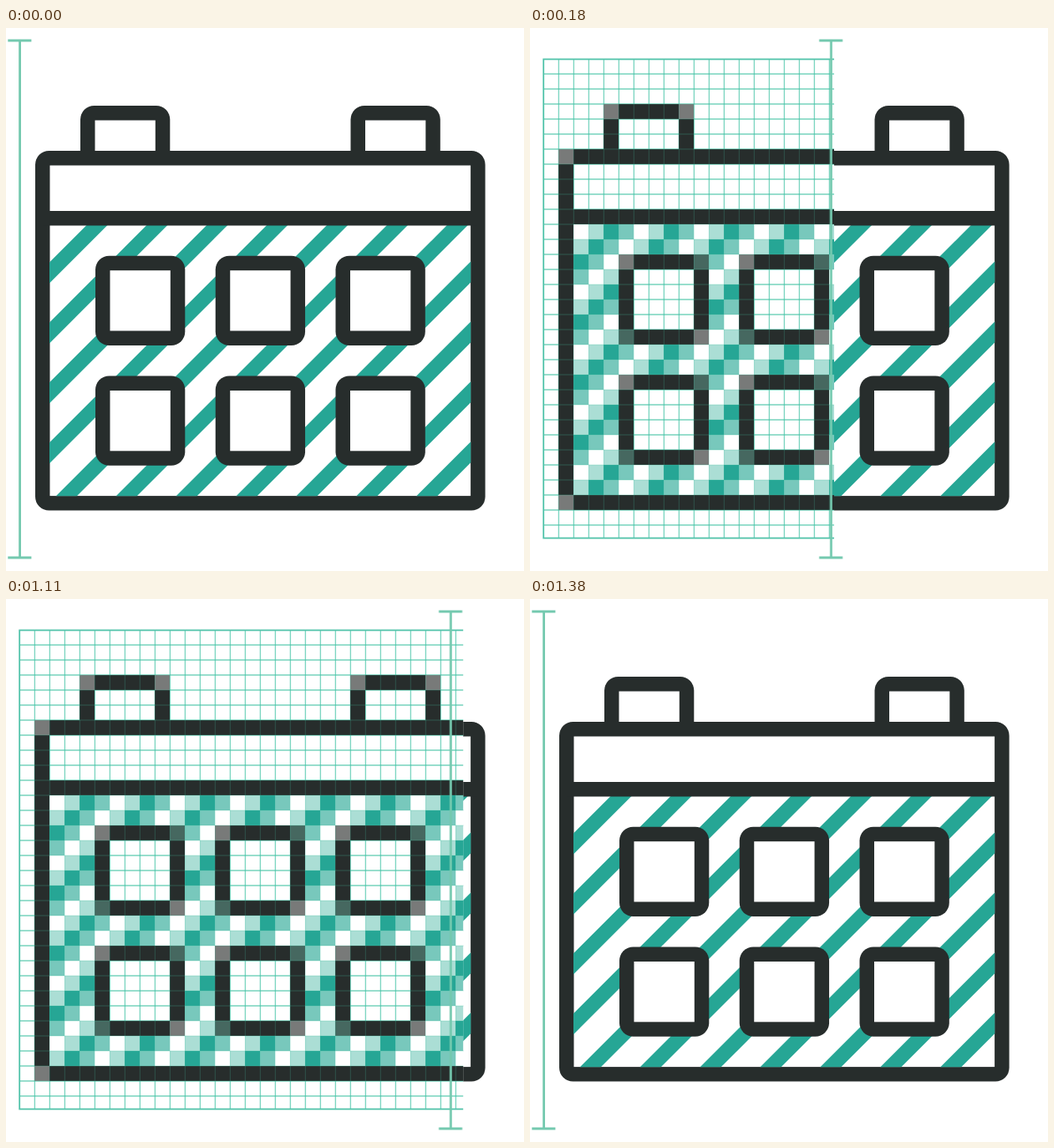
Write an HTML page that moves like this. It is 620 by 650 pixels and loops after 2250 ms.

```html
<!DOCTYPE html>
<html lang="en">
<head>
<meta charset="utf-8">
<title>Calendar icon: vector to pixels</title>
<style>
  html, body { margin: 0; width: 100%; height: 100%; overflow: hidden; background: #fff; }
  svg { position: absolute; left: 0; top: 0; width: 620px; height: 650px; }
  #pixels { animation: reveal 2250ms infinite; }
  #bar { animation: sweep 2250ms infinite; }

  /* ten 30 ms steps out, a hold, ten steps back, a hold */
  @keyframes sweep {
    0% { transform: translateX(0); animation-timing-function: steps(10, end); }
    13.3333%, 48% { transform: translateX(573px); animation-timing-function: steps(10, end); }
    61.3333%, 100% { transform: translateX(0); }
  }
  @keyframes reveal {
    0% { clip-path: inset(0 622.7px 0 0); animation-timing-function: steps(10, end); }
    13.3333% { clip-path: inset(0 11.7px 0 0); }
    48% { clip-path: inset(0 11px 0 0); animation-timing-function: steps(10, end); }
    61.3333%, 100% { clip-path: inset(0 629px 0 0); }
  }
</style>
</head>
<body>
<svg id="smooth" viewBox="0 0 620 650">
  <clipPath id="page"><rect x="52" y="236" width="504.3" height="324.3"/></clipPath>
</svg>
<svg id="pixels" viewBox="0 0 620 650"></svg>
<svg viewBox="0 0 620 650">
  <path id="bar" d="M2.3 15H30.4M2.3 634H30.4M16.6 15V634" fill="none" stroke="#74c9af" stroke-width="2.8"/>
</svg>
<script>
  const INK = '#272d2c', GRAY = '#787a79', MIXED = '#466860';
  const STRIPES = ['#78c8bc', '#ffffff', '#abded5', '#26a695'];

  function add(parent, tag, attrs) {
    const el = document.createElementNS('http://www.w3.org/2000/svg', tag);
    for (const name in attrs) el.setAttribute(name, attrs[name]);
    parent.appendChild(el);
    return el;
  }
  const box = (parent, x, y, width, height, fill, rx = 0) =>
    add(parent, 'rect', { x, y, width, height, fill, rx });

  // Smooth icon
  const smooth = document.getElementById('smooth');
  const EDGE = 17.5;

  function roundFrame(x, y, w, h) {
    box(smooth, x, y, w, h, INK, 16.5);
    box(smooth, x + EDGE, y + EDGE, w - 2 * EDGE, h - 2 * EDGE, '#fff');
  }

  for (const x of [89, 412.5]) {
    box(smooth, x, 93, 107.3, 80, INK, 16.5);
    box(smooth, x + EDGE, 110.5, 72.3, 40, '#fff');
  }
  roundFrame(35, 147, 538.6, 430.6);
  const stripes = add(smooth, 'g', { 'clip-path': 'url(#page)' });
  for (let i = 0; i < 11; i++) {
    const sum = 332.5 + 71.9 * i;
    add(stripes, 'path', {
      d: `M${sum - 230} 230h25l-340 340h-25z`,
      fill: STRIPES[3]
    });
  }
  box(smooth, 44, 219, 520, EDGE, INK);
  for (let row = 0; row < 2; row++)
    for (let col = 0; col < 3; col++)
      roundFrame(107 + 143.75 * col, 272.7 + 143.8 * row, 107.3, 107.3);

  // Pixel version on a grid of 18 px cells
  const pixels = document.getElementById('pixels');
  const CELL = 18, LEFT = 16.4, TOP = 37;

  box(pixels, 15, 36, 579, 576, '#fff');

  function gridLines(color, opacity) {
    let rows = '', cols = '';
    for (let i = 1; i < 32; i++) {
      rows += `M${LEFT} ${TOP + CELL * i}H591`;
      cols += `M${LEFT + CELL * i} ${TOP}V610.5`;
    }
    const style = { stroke: color, opacity, fill: 'none' };
    add(pixels, 'path', { d: rows, 'stroke-width': 1.7, ...style });
    add(pixels, 'path', { d: cols, 'stroke-width': 1.3, ...style });
  }

  gridLines('#45c4a7', 0.62);
  const cells = add(pixels, 'g', { 'shape-rendering': 'crispEdges' });
  const fillCells = (c, r, w, h, color) =>
    box(cells, LEFT + CELL * c, TOP + CELL * r, w * CELL, h * CELL, color);

  function pixelFrame(c, r, w, h, side) {
    const right = c + w - 1, bottom = r + h - 1;
    fillCells(c, r, w, 1, INK);
    fillCells(c, bottom, w, 1, INK);
    fillCells(c, r, 1, h, INK);
    fillCells(right, r, 1, h, INK);
    fillCells(c, r, 1, 1, GRAY);
    fillCells(right, bottom, 1, 1, GRAY);
    fillCells(right, r, 1, 1, side);
    fillCells(c, bottom, 1, 1, side);
  }

  const inDay = (c, r) =>
    c >= 5 && c < 27 && (c - 5) % 8 < 6 && r >= 13 && r < 27 && (r - 13) % 8 < 6;

  for (let r = 11; r < 29; r++)
    for (let c = 2; c < 30; c++)
      if (!inDay(c, r)) fillCells(c, r, 1, 1, STRIPES[(c + r) % 4]);

  for (const c of [4, 22]) {
    fillCells(c, 3, 6, 1, INK);
    for (const side of [c, c + 5]) {
      fillCells(side, 3, 1, 3, INK);
      fillCells(side, 3, 1, 1, GRAY);
    }
  }
  pixelFrame(1, 6, 30, 24, GRAY);
  fillCells(2, 10, 28, 1, INK);
  for (const r of [13, 21])
    for (const c of [5, 13, 21]) pixelFrame(c, r, 6, 6, MIXED);

  gridLines('#45c4a7', 0.2);
  add(pixels, 'rect', {
    x: 16.2, y: 37.4, width: 573.6, height: 573.2,
    fill: 'none', stroke: '#52c3aa', 'stroke-width': 1.8
  });
</script>
</body>
</html>
```
